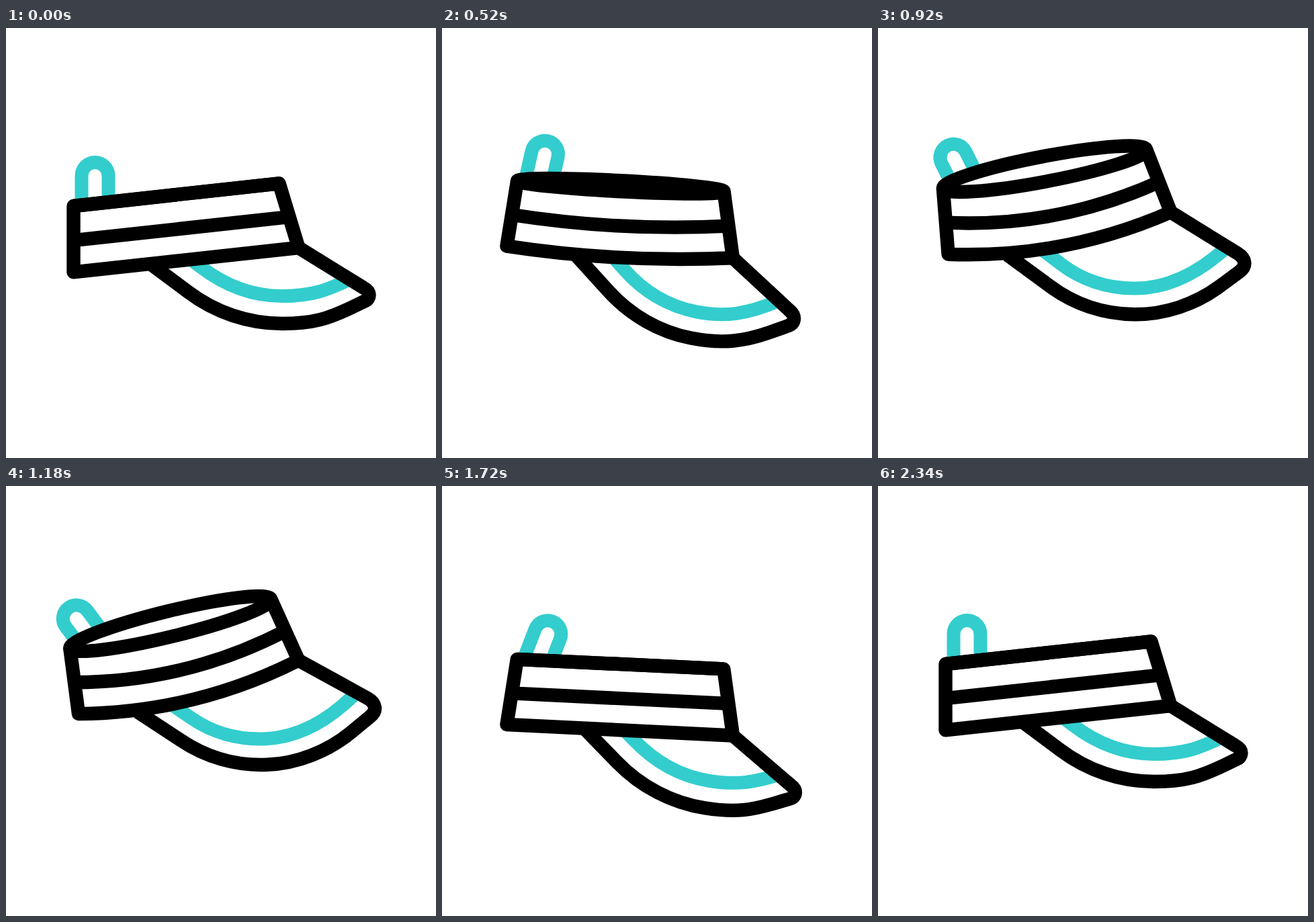
Write an HTML page that moves like this. It is 640 px wide and 640 px high and loops after 2800 ms.

```html
<!DOCTYPE html>
<html>
<head>
<meta charset="utf-8">
<style>
  html, body { margin: 0; width: 100%; height: 100%; overflow: hidden; background: #fff; }
  svg { display: block; width: 100vw; height: 100vh; }
  path { fill: none; stroke: #000; stroke-width: 20.4; stroke-linejoin: round; }
  .cyan { stroke: #33cdcd; stroke-width: 20; }
  #band { fill: #fff; }
</style>
</head>
<body>
<svg viewBox="0 0 640 640">
  <g id="visor">
    <path id="clip" class="cyan" d="M112.5 264V220a20 20 0 0 1 40 0V264"/>
    <path id="trim" class="cyan"/>
    <path id="brim"/>
    <path id="band"/>
    <path id="stripes"/>
  </g>
</svg>
<script>
const LOOP = 2800;

// Poses: time, height, tilt of the visor, lean of the clip, opening
const poses = [
  [200, 0, 0, 0, 0],
  [370, 28, 7.5, 12, 0.05],
  [520, -3, 9.2, 3.5, 0.42],
  [740, -35, -1.5, -15, 0.97],
  [1330, -54, -8, -31, 1],
  [1460, -38.5, -7.2, -23, 0.88],
  [1720, 26.5, 9, 12, 0],
  [1940, -18.8, -0.8, -10.5, 0],
  [2050, -31, -4.6, -19, 0],
  [2340, 0, 0, 0, 0]
];

// Shapes seen flat and seen from above
const brim = [
  'M215 351L270 392C312 424 362 440 411 440S482 431 510 418L534 406.5C543 402.5 543 392 532 386.5L435.5 327',
  'M188 372L246 422C281 453 324 471 369 475S461 467 498 444L530 424C542 417 542 405 529.5 396L435.5 327'];
const trim = [
  'M262 335L289 355C324 382 366 399 411 399S478 390 512 374',
  'M241 369L266 391.5C294 417 331 433 372 436.5S460 428 513 387'];
const TL = [100.5, 265], TR = [406.5, 231.3], BL = [100.5, 363.4], BR = [435.5, 327];

// Smooth curve through one column of the poses that never overshoots them
function sample(col, t) {
  const last = poses.length - 1;
  if (t <= poses[0][0] || t >= poses[last][0]) return 0;
  const i = poses.findIndex(p => p[0] > t) - 1;
  const secant = j => (poses[j + 1][col] - poses[j][col]) / (poses[j + 1][0] - poses[j][0]);
  const slope = j => {
    if (j === 0 || j === last) return 0;
    const a = secant(j - 1), b = secant(j);
    return a * b <= 0 ? 0 : 2 * a * b / (a + b);
  };
  const a = poses[i], b = poses[i + 1];
  const h = b[0] - a[0], u = (t - a[0]) / h, w = 1 - u;
  return w * w * (1 + 2 * u) * a[col] + u * u * (3 - 2 * u) * b[col]
    + h * u * w * (w * slope(i) - u * slope(i + 1));
}

const mix = (a, b, k) => a.map((v, i) => v + (b[i] - v) * k);

function morph([a, b], k) {
  const ends = b.match(/[\d.]+/g);
  let i = 0;
  return a.replace(/[\d.]+/g, n => +n + (ends[i++] - n) * k);
}

// Half ellipse from p to q
function rim(p, q, k, sweep) {
  const dx = q[0] - p[0], dy = q[1] - p[1];
  const angle = Math.atan2(dy, dx) * 180 / Math.PI;
  return k < 0.001 ? `L${q}` : `A${Math.hypot(dx, dy) / 2} ${19 * k} ${angle} 0 ${sweep} ${q}`;
}

// Shallow curve from p to q, hanging below the straight line
function sag(p, q, k) {
  const [x, y] = mix(p, q, 0.5);
  return `Q${x + 4.3 * k} ${y + 39 * k} ${q}`;
}

function set(id, name, value) {
  document.getElementById(id).setAttribute(name, value);
}

function draw(t) {
  const [rise, tilt, lean, open] = [1, 2, 3, 4].map(col => sample(col, t));
  const ML = mix(TL, BL, 0.52), MR = mix(TR, BR, 0.52);
  set('visor', 'transform', `translate(0 ${rise}) rotate(${tilt} 320 320)`);
  set('clip', 'transform', `translate(0 ${-2 * open}) rotate(${lean} 132.5 254)`);
  set('brim', 'd', morph(brim, open));
  set('trim', 'd', morph(trim, open));
  set('band', 'd', `M${TL}${rim(TL, TR, open, 1)}L${BR}${sag(BR, BL, open)}Z`);
  set('stripes', 'd', `M${TL}${rim(TL, TR, open, 0)}M${ML}${sag(ML, MR, open)}`);
}

const start = performance.now();
function tick() {
  draw((performance.now() - start) % LOOP);
  requestAnimationFrame(tick);
}
tick();
</script>
</body>
</html>
```
